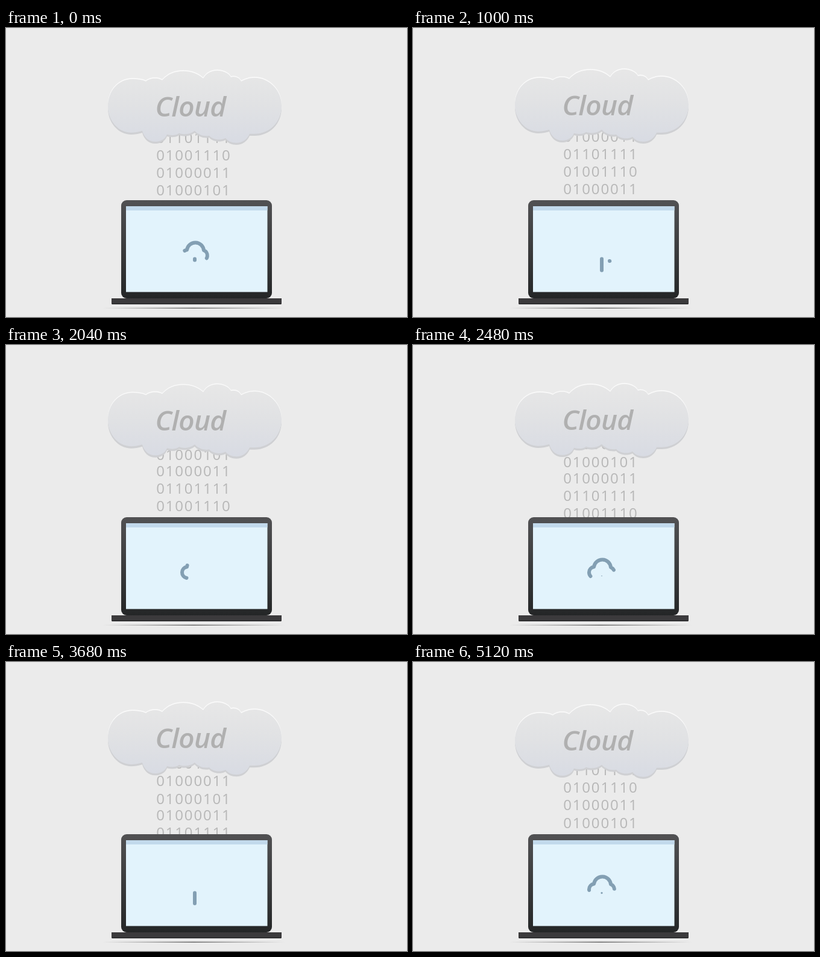
Write an HTML page that moves like this. It is 665x480 px and loops after 5.16 s.

```html
<!DOCTYPE html>
<html lang="en">
<head>
<meta charset="utf-8">
<title>Cloud download</title>
<style>
  html, body { margin: 0; width: 100%; height: 100%; overflow: hidden; background: #ebebeb; }
  svg { display: block; width: 665px; height: 480px; }
  text { font-family: "Open Sans", "Noto Sans", sans-serif; }
  .bits { font-size: 24px; letter-spacing: 1.8px; fill: #b7b7b7; }
  .title { font-size: 46px; font-weight: 600; font-style: italic; letter-spacing: -.7px; fill: #b0b0b0; }
  .icon { fill: none; stroke: #839fb3; stroke-width: 6; stroke-linecap: round; stroke-linejoin: round; }
</style>
</head>
<body>
<svg viewBox="0 0 665 480">
  <defs>
    <linearGradient id="cloudFill" x2="0" y2="1">
      <stop stop-color="#e7e7e7"/><stop offset=".45" stop-color="#e1e2e4"/><stop offset="1" stop-color="#d8dbe3"/>
    </linearGradient>
    <linearGradient id="bezel" x2="0" y2="1">
      <stop stop-color="#515153"/><stop offset="1" stop-color="#242627"/>
    </linearGradient>
    <linearGradient id="ground">
      <stop stop-color="#333" stop-opacity="0"/><stop offset=".5" stop-color="#222"/><stop offset="1" stop-color="#333" stop-opacity="0"/>
    </linearGradient>
    <path id="puff" d="M169 129C169 104 186 84 210 84C218 84 226 85 232 88C238 83 250 81 259 86C268 76 280 71 294 71C307 71 318 75 327 83C332 75 340 70 350 70C360 70 369 74 373 81C380 79 387 82 390 88C396 85 403 82 412 82C437 82 457 103 457 128C457 156 437 175 412 175L404 175C400 184 392 190 382 190C374 190 368 187 364 182C354 187 342 184 337 178C328 180 318 176 313 170C305 176 296 177 287 174C282 178 274 178 267 176C264 184 256 188 247 188C237 188 229 181 226 170C220 172 213 173 208 173C186 173 169 153 169 129Z"/>
  </defs>

  <rect width="665" height="480" fill="#ebebeb"/>
  <g id="rows" class="bits"></g>

  <g id="cloud">
    <use href="#puff" y="4" fill="#cfd0d3"/>
    <use href="#puff" y="-1" fill="#fafafa"/>
    <use href="#puff" y=".7" fill="url(#cloudFill)"/>
    <text class="title" x="306" y="147" text-anchor="middle">Cloud</text>
  </g>

  <rect x="191" y="286" width="250" height="163" rx="9" fill="url(#bezel)"/>
  <rect x="199" y="296" width="234.5" height="142.5" fill="#e2f3fc"/>
  <rect x="199" y="296" width="234.5" height="7" fill="#c2d9eb"/>
  <path d="M175 449H457V457.500Q457 459 455.500 459H176.500Q175 459 175 457.500Z" fill="#3b3a3c"/>
  <rect x="176" y="457.500" width="280" height="1.500" fill="#2b2b2c"/>
  <rect x="160" y="464.700" width="302" height="1" fill="url(#ground)"/>

  <g class="icon">
    <path id="outline" pathLength="100" d="M299.500 387A9.400 9.400 0 0 1 300 368.500A14.100 14.100 0 0 1 328 369.300A9.200 9.200 0 0 1 326 387"/>
    <path id="stem"/>
    <path id="wings"/>
  </g>
</svg>
<script>
const LOOP = 5160, CYCLE = 5200, ICON_CYCLE = 2600;
const ROW_TOP = 152, ROW_SPAN = 143.8;
const words = [["01101111", 0], ["01001110", 29], ["01000011", 58], ["01000101", 87.5], ["01000011", 114.5]];

const el = id => document.getElementById(id);
const mod = (a, n) => ((a % n) + n) % n;
const progress = (t, start, length) => Math.min(1, Math.max(0, (t - start) / length));
const sineInOut = p => (1 - Math.cos(Math.PI * p)) / 2;
const quadOut = p => 1 - (1 - p) ** 2;
const show = (node, on) => node.setAttribute("visibility", on ? "visible" : "hidden");

const rows = words.map(([bits, offset]) => {
  const node = document.createElementNS("http://www.w3.org/2000/svg", "text");
  node.textContent = bits;
  node.setAttribute("x", 249.3);
  el("rows").append(node);
  return { node, offset };
});

function drawRows(t) {
  for (const { node, offset } of rows) {
    const centre = ROW_TOP + mod(182 + offset - ROW_TOP + ROW_SPAN * t / CYCLE, ROW_SPAN);
    node.setAttribute("y", (centre + 8.5).toFixed(2));
  }
}

function drawOutline(q) {
  const head = 100 * sineInOut(progress(q, -1060, 1320));
  const tail = 100 * quadOut(progress(q, -160, 1230));
  const line = el("outline");
  show(line, tail < 100);
  line.setAttribute("stroke-dasharray", `${Math.max(.01, head - tail)} 200`);
  line.setAttribute("stroke-dashoffset", -tail);
}

function drawArrow(q) {
  const width = 6 * (progress(q, -160, 150) - progress(q, 1490, 50));
  const grow = progress(q, -50, 490) - progress(q, 850, 640) ** 2;
  const spread = 5.5 * (progress(q, 310, 140) - progress(q, 720, 130));
  const tip = 383.5 + 20 * grow;
  const stem = el("stem"), wings = el("wings");
  show(stem, width > 0);
  stem.setAttribute("stroke-width", width);
  stem.setAttribute("d", `M313 383.500V${tip + .01}`);
  show(wings, spread > 0);
  wings.setAttribute("d", `M${313 - spread} ${tip - spread}L313 ${tip}L${313 + spread} ${tip - spread}`);
}

function render(t) {
  const bob = 3 * Math.cos(2 * Math.PI * t / CYCLE) - 3;
  el("cloud").setAttribute("transform", `translate(0 ${bob.toFixed(2)})`);
  drawRows(t);
  // The icon's cycle begins with the first dot of its outline.
  const q = mod(t + 1060, ICON_CYCLE) - 1060;
  drawOutline(q);
  drawArrow(q);
}

const begin = performance.now();
function tick() {
  render((performance.now() - begin) % LOOP);
  requestAnimationFrame(tick);
}
tick();
</script>
</body>
</html>
```
